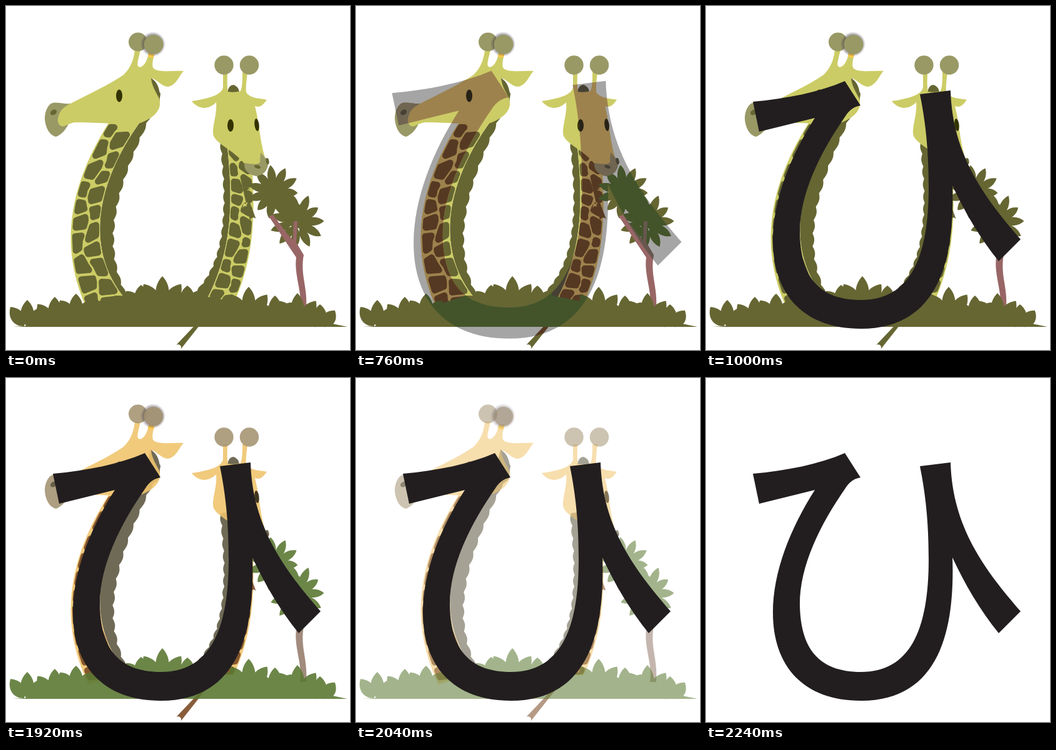
Recreate the animation shown at these times as an HTML page with a canvas. Size 550 by 550 pixels, loop 3000 ms.

```html
<!DOCTYPE html>
<html lang="ja">
<head>
<meta charset="utf-8">
<title>ひ</title>
<style>
html, body { margin: 0; width: 100%; height: 100%; overflow: hidden; background: #fff; }
canvas { display: block; width: 550px; height: 550px; }
</style>
</head>
<body>
<canvas id="stage" width="550" height="550"></canvas>
<script>
const ctx = document.getElementById('stage').getContext('2d');
const LOOP = 3000, STEP = 40, INK = '#221e1f';

// Flat colours at rest; the rich ones show under the letter and in the fade.
const flat = { skin: '#cc6', dark: '#663', spot: '#663', leaf: '#663', horn: '#996', eye: '#330', wood: '#966' };
const rich = { skin: '#f0c46c', dark: '#5e5842', spot: '#7a4a24', leaf: '#5a7832', horn: '#a59473', eye: '#2b2412', wood: '#967d6e' };

const letter = new Path2D(`M75 153C130 148 180 138 222 120L247 159C237 161 229 166 223 176
  C182 235 150 300 150 362C151 430 178 470 248 470C325 470 356 405 356 290C356 230 351 185 342 141
  L391 135C394 240 447 308 503 373L468 408C438 371 414 330 394 287C398 400 375 516 248 516
  C155 516 107 460 107 375C107 310 135 240 174 179L85 201Z`);

const noise = n => {
  const v = Math.sin(n * 12.9898) * 43758.5453;
  return v - Math.floor(v) - 0.5;
};
const mix = (a, b, t) => a.map((v, i) => v + (b[i] - v) * t);

// Point on a cubic curve given by four points.
function along(curve, t) {
  while (curve.length > 1) curve = curve.slice(1).map((p, i) => mix(curve[i], p, t));
  return curve[0];
}

function ellipse(x, y, rx, ry = rx, turn = 0) {
  const p = new Path2D();
  p.ellipse(x, y, rx, ry, turn, 0, 7);
  return p;
}

// Area between two curves; `bump` scallops the second one.
function band(a, b, bump = 0, extra = '') {
  const path = new Path2D(extra), n = 120;
  for (let i = 0; i <= n; i++) path.lineTo(...along(a, i / n));
  for (let i = n; i >= 0; i--) {
    const [x, y] = along(b, i / n);
    path.lineTo(x + bump * Math.abs(Math.sin(i / n * Math.PI * 15)), y);
  }
  path.closePath();
  return path;
}

// Two staggered columns of rounded patches between two curves.
function patches(a, b, rows, seed) {
  const path = new Path2D();
  const split = v => 0.5 + 0.13 * Math.sin(v * 21 + seed);
  const place = (u, v) => mix(along(a, v), along(b, v), u);
  for (let col = 0; col < 2; col++) {
    const edge = (i, side) => Math.max(0.01, Math.min(1, (i + col * 0.45 + 0.5 * noise(seed + i * 4 + col * 2 + side)) / rows));
    for (let i = 0; i < rows; i++) {
      const [o0, o1, s0, s1] = [edge(i, 0), edge(i + 1, 0), edge(i, 1), edge(i + 1, 1)];
      const mid = (s0 + s1) / 2;
      const cell = [[col, o0], [split(s0), s0], [split(mid), mid], [split(s1), s1], [col, o1]].map(p => place(...p));
      const centre = cell.reduce((c, p) => [c[0] + p[0] / 5, c[1] + p[1] / 5], [0, 0]);
      const pts = cell.map(p => mix(centre, p, 0.87));
      path.moveTo(...mix(pts[4], pts[0], 0.5));
      pts.forEach((p, k) => path.arcTo(...p, ...mix(p, pts[(k + 1) % 5], 0.5), 5));
      path.closePath();
    }
  }
  return path;
}

// Pointed leaf; the angle is measured clockwise from straight up.
function leaf(path, x, y, angle, len, w) {
  const s = Math.sin(angle), c = Math.cos(angle);
  const at = (f, side) => [x + s * len * f - c * w * side, y - c * len * f - s * w * side];
  path.moveTo(x, y);
  path.bezierCurveTo(...at(0.25, 1), ...at(0.7, 1), ...at(1, 0));
  path.bezierCurveTo(...at(0.7, -1), ...at(0.25, -1), x, y);
}

function tree() {
  const path = new Path2D('M412 278L440 280L462 312L486 330L484 358L458 354L436 330L414 306Z');
  for (const [x, y, r, turn] of [[428, 298, 41, -0.12], [466, 345, 43, 0.4]])
    for (let i = 0; i < 11; i++) {
      const a = turn + i * Math.PI * 2 / 11;
      leaf(path, x + Math.sin(a) * 9, y - Math.cos(a) * 9, a, r - 9 + 6 * noise(i + x), 9);
    }
  return path;
}

function bush() {
  const path = new Path2D(`M10 513L30 512L45 501L110 492L130 478L175 463L215 464L300 462L330 466L370 474
    L385 482L460 490L510 500L522 508L546 513Z`);
  const clumps = [[34, 512, 42], [78, 508, 43], [112, 500, 40], [216, 482, 36], [250, 480, 48], [290, 480, 33],
    [388, 496, 47], [430, 504, 41], [466, 506, 47], [502, 513, 36]];
  for (const [x, y, h] of clumps)
    for (const k of [-1, 0, 1]) leaf(path, x + k * 5, y, k * 0.62, h * (1 - 0.1 * Math.abs(k)), 14);
  return path;
}

const leftFront = [[166, 184], [98, 290], [84, 390], [132, 490]];
const leftBack = [[214, 186], [150, 275], [120, 385], [192, 470]];
const leftMane = [[247, 140], [188, 260], [140, 365], [193, 466]];
const rightBack = [[353, 215], [362, 305], [366, 385], [318, 475]];
const rightFront = [[392, 240], [398, 315], [401, 395], [364, 475]];
const rightMane = [[344, 216], [354, 318], [358, 415], [294, 466]];

// [colour key, shape], back to front.
const parts = [
  ['dark', band(leftBack, leftMane, 3, 'M231 114L214 186L244 162Q250 134 238 120Z')],
  ['skin', band(leftFront, leftBack)],
  ['spot', patches(leftFront, leftBack, 10, 3)],
  ['horn', new Path2D('M72 156C80 152 90 157 103 156L100 188C96 198 88 206 80 209C70 207 63 195 62 180C62 170 66 160 72 156Z')],
  ['skin', new Path2D(`M84 176C86 166 95 160 103 156C130 142 165 126 188 110C200 98 204 86 206 70L215 70
    C212 84 209 92 211 96C214 100 219 96 222 92C225 87 227 82 228 74L238 74C234 88 233 96 236 100
    C246 107 268 103 284 104C276 112 272 128 258 129C248 128 244 119 232 115C233 128 240 138 245 148
    C250 165 238 178 215 187C195 190 140 186 110 186C98 188 94 194 88 192C82 188 82 182 84 176Z`)],
  ['dark', ellipse(76, 170, 5.5, 4, -0.6)],
  ['eye', ellipse(181, 143.5, 5, 10)],
  ['horn', ellipse(211, 57.5, 15)],
  ['halo', ellipse(235, 61, 20)],
  ['horn', ellipse(236, 61.5, 15.5)],
  ['dark', band(rightBack, rightMane, -2.5)],
  ['dark', new Path2D('M354 138Q356 126 364 126Q372 129 373 138Z')],
  ['skin', band(rightBack, rightFront)],
  ['spot', patches(rightBack, rightFront, 10, 8)],
  ['leaf', tree()],
  ['wood', new Path2D(`M420 336L427 334L451 366L459 374L460 344L466 344L464 378L476 398
    C470 430 483 450 480 486L470 486C475 460 460 430 464 402Z`)],
  ['skin', new Path2D(`M347 106L347 130C345 142 325 148 297 152C306 164 322 168 336 154C338 175 328 195 332 208
    C338 222 370 234 384 256L418 252C406 225 406 190 398 160C408 164 412 156 417 150C405 147 392 149 384 138
    C383 128 385 118 386 106L378 106C378 120 378 128 375 136Q364 139 355 137C353 128 354 118 354 106Z`)],
  ['horn', new Path2D('M407 234L420 249C418 262 414 270 400 272C390 270 380 264 381 251C395 253 402 254 406 250Z')],
  ['dark', ellipse(402, 257, 5, 2.6, 0.3)],
  ['dark', ellipse(418, 248, 2.5, 5, -0.2)],
  ['eye', ellipse(359, 191, 5, 10)],
  ['eye', ellipse(401, 190, 3.6, 10, -0.12)],
  ['horn', ellipse(348.5, 94.5, 15.2)],
  ['horn', ellipse(389, 94.5, 15.2)],
  ['leaf', bush()]
];

const halo = ctx.createRadialGradient(235, 61, 14, 235, 61, 20);
halo.addColorStop(0, 'rgba(70,60,75,.6)');
halo.addColorStop(1, 'rgba(70,60,75,0)');
const glow = ellipse(232, 79, 5, 3.5);

function scene(colors, alpha) {
  ctx.globalAlpha = alpha;
  for (const [key, shape] of parts) {
    if (key === 'halo') {
      ctx.fillStyle = '#fc4';
      ctx.fill(glow);
    }
    ctx.fillStyle = key === 'halo' ? halo : colors[key];
    ctx.fill(shape);
  }
  ctx.globalAlpha = 1;
}

function zoom(s) {
  ctx.setTransform(s, 0, 0, s, 289 * (1 - s), 322 * (1 - s));
}

// Steps counted from `start`, the first one taken at once.
function steps(t, start, count) {
  return Math.max(0, Math.min(count, Math.floor((t - start) / STEP) + 1));
}

function draw(shown, gone) {
  ctx.clearRect(0, 0, 550, 550);
  if (gone) scene(rich, 1 - gone / 9);
  else scene(flat, 1);
  if (!shown) return;

  const size = 1 + 0.1225 * (10 - shown) / 9;
  ctx.save();
  zoom(size);
  if (shown < 10) {
    ctx.clip(letter);
    ctx.setTransform(1, 0, 0, 1, 0, 0);
    scene(rich, 1);
    ctx.restore();
    ctx.save();
    zoom(size);
  }
  ctx.globalAlpha = shown / 10;
  ctx.fillStyle = INK;
  ctx.fill(letter);
  if (shown < 3) {
    ctx.globalAlpha = 0.8;
    ctx.lineWidth = 0.7;
    ctx.strokeStyle = INK;
    ctx.stroke(letter);
  }
  ctx.restore();
}

const born = performance.now();
let last = '';
function tick() {
  const t = (performance.now() - born) % LOOP;
  const shown = steps(t, 640, 10), gone = steps(t, 1920, 9);
  const state = shown + '/' + gone;
  if (state !== last) draw(shown, gone);
  last = state;
  requestAnimationFrame(tick);
}
tick();
</script>
</body>
</html>
```
